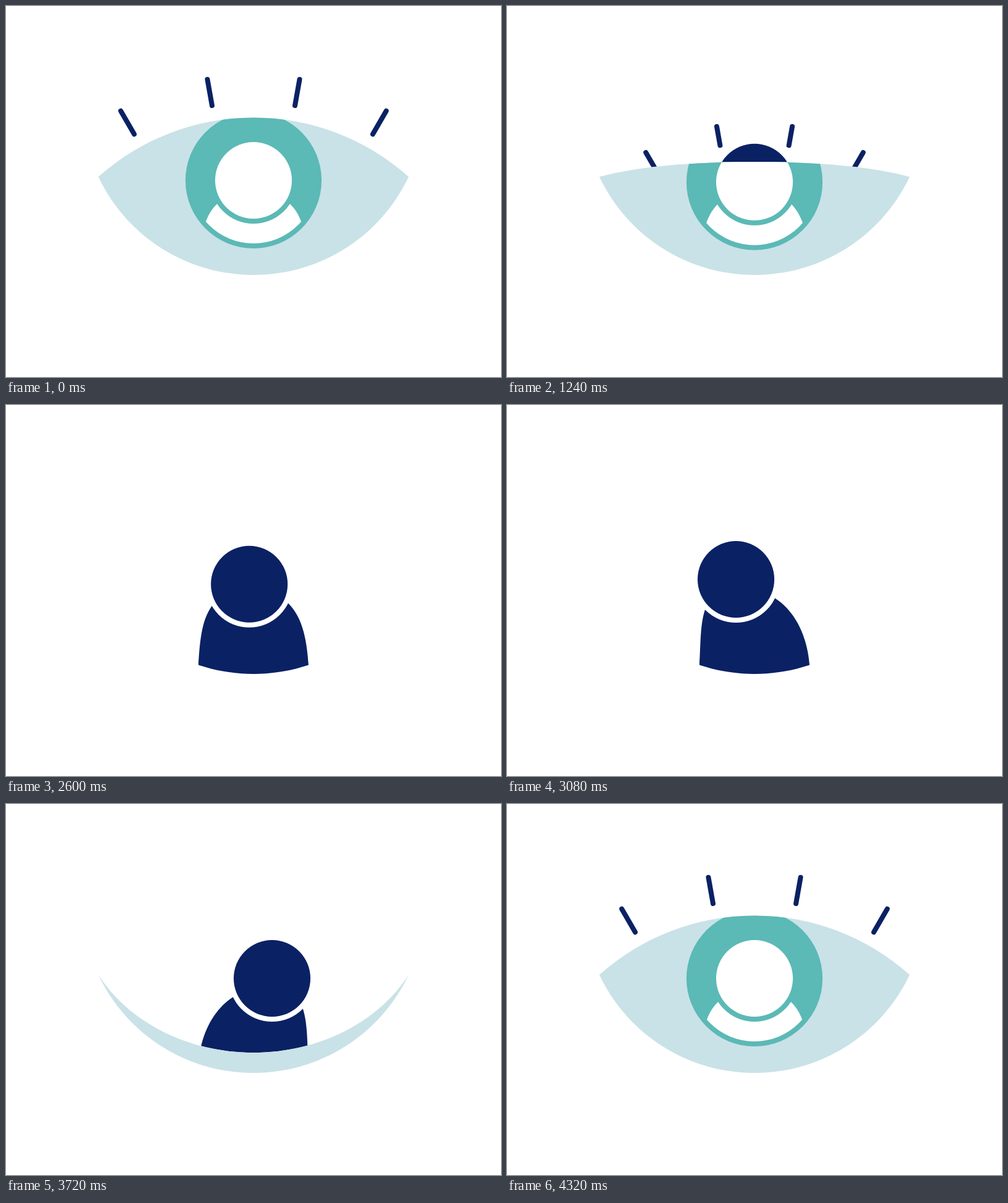
Recreate the animation shown at these times as an HTML page with a canvas. Size 800 by 600 pixels, loop 4.48 s.

```html
<!DOCTYPE html>
<html lang="en">
<head>
<meta charset="utf-8">
<title>Eye and person</title>
<style>
  html, body { margin: 0; width: 100%; height: 100%; overflow: hidden; background: #fff; }
  canvas { display: block; }
</style>
</head>
<body>
<canvas id="stage" width="800" height="600"></canvas>
<script>
const ctx = document.getElementById('stage').getContext('2d');
const NAVY = '#0a2163', TEAL = '#5bb9b6', PALE = '#c9e2e7', WHITE = '#fff';
const LOOP = 4480, STEP = 40;
const LEFT = 149.3, RIGHT = 650.7, CORNER = 276.3, CX = 400;

// Tip, root and vanishing point of the left-hand lashes; the others mirror them.
const LASHES = [
  [[185.5, 169.7], [207.2, 207.2], [324, 409]],
  [[325.5, 118.7], [333, 161], [373.5, 390]]
];

const mix = (a, b, k) => a + (b - a) * k;
const progress = (t, from, to) => Math.min(1, Math.max(0, (t - from) / (to - from)));
const sineIn = u => 1 - Math.cos(u * Math.PI / 2);
const powerOut = n => u => 1 - (1 - u) ** n;
const quadOut = powerOut(2), quartOut = powerOut(4);

function pose(t) {
  const shut = sineIn(progress(t, 895, 1600));
  const lean = quartOut(progress(t, 2560, 3200));
  const cross = quartOut(progress(t, 3160, 3800));
  const back = quartOut(progress(t, 3720, 4320));
  return {
    lid: shut - quadOut(progress(t, 3680, 4280)),
    lash: shut - quadOut(progress(t, 3720, 4320)),
    x: CX - 30 * lean + 60 * cross - 30 * back,
    y: 282 + 10 * shut - 10 * lean
  };
}

// Lid edge from the left corner to the right: k = 0 is open, 1 is the lower rim.
function lidEdge(k, reverse) {
  const hx = mix(68.9, 45.9, k), hy = CORNER + mix(-61.8, 97.1, k);
  const reach = mix(92.6, 107.4, k), mid = mix(180.5, 435, k);
  const s = reverse ? -1 : 1;
  const start = reverse ? RIGHT : LEFT, end = reverse ? LEFT : RIGHT;
  ctx.lineTo(start, CORNER);
  ctx.bezierCurveTo(start + s * hx, hy, CX - s * reach, mid, CX, mid);
  ctx.bezierCurveTo(CX + s * reach, mid, end - s * hx, hy, end, CORNER);
}

function disc(x, y, r, color) {
  ctx.beginPath();
  ctx.arc(x, y, r, 0, Math.PI * 2);
  ctx.fillStyle = color;
  ctx.fill();
}

function person({ x, y }, color, gapColor) {
  const k = (x - CX) / 30, top = 300 - 5 * Math.abs(k);
  const leftPull = 320 + k * (k < 0 ? 13 : 26);
  const rightPull = 480 + k * (k < 0 ? 26 : 13);
  ctx.beginPath();
  ctx.moveTo(311, 420.4);
  ctx.bezierCurveTo(315, 365, leftPull, top, x, top);
  ctx.bezierCurveTo(rightPull, top, 485, 365, 489, 420.4);
  ctx.lineTo(489, 440);
  ctx.lineTo(311, 440);
  ctx.fillStyle = color;
  ctx.fill();
  disc(x, y, 70, gapColor);
  disc(x, y, 62, color);
}

function lashes(k) {
  ctx.strokeStyle = NAVY;
  ctx.lineWidth = 8;
  ctx.lineCap = 'round';
  for (const [tip, root, end] of LASHES) {
    const at = p => [mix(p[0], end[0], k), mix(p[1], end[1], k)];
    const [x1, y1] = at(tip), [x2, y2] = at(root);
    ctx.beginPath();
    ctx.moveTo(x1, y1);
    ctx.lineTo(x2, y2);
    ctx.moveTo(2 * CX - x1, y1);
    ctx.lineTo(2 * CX - x2, y2);
    ctx.stroke();
  }
}

function aboveLid(p) {
  ctx.save();
  ctx.beginPath();
  ctx.moveTo(LEFT, 0);
  lidEdge(p.lid);
  ctx.lineTo(RIGHT, 0);
  ctx.clip();
  lashes(p.lash);
  if (p.lid > 0) person(p, NAVY, WHITE);
  ctx.restore();
}

function eye(p) {
  ctx.save();
  ctx.beginPath();
  ctx.moveTo(LEFT, CORNER);
  lidEdge(p.lid);
  lidEdge(1, true);
  ctx.fillStyle = PALE;
  ctx.fill();
  ctx.clip();
  disc(p.x, p.y, 110, TEAL);
  ctx.beginPath();
  ctx.arc(p.x, p.y, 102, 0, Math.PI * 2);
  ctx.clip();
  person(p, WHITE, TEAL);
  ctx.restore();
}

function draw() {
  const t = Math.floor(performance.now() % LOOP / STEP) * STEP;
  const p = pose(t);
  ctx.fillStyle = WHITE;
  ctx.fillRect(0, 0, 800, 600);
  aboveLid(p);
  if (p.lid < 1) eye(p);
  requestAnimationFrame(draw);
}
draw();
</script>
</body>
</html>
```
